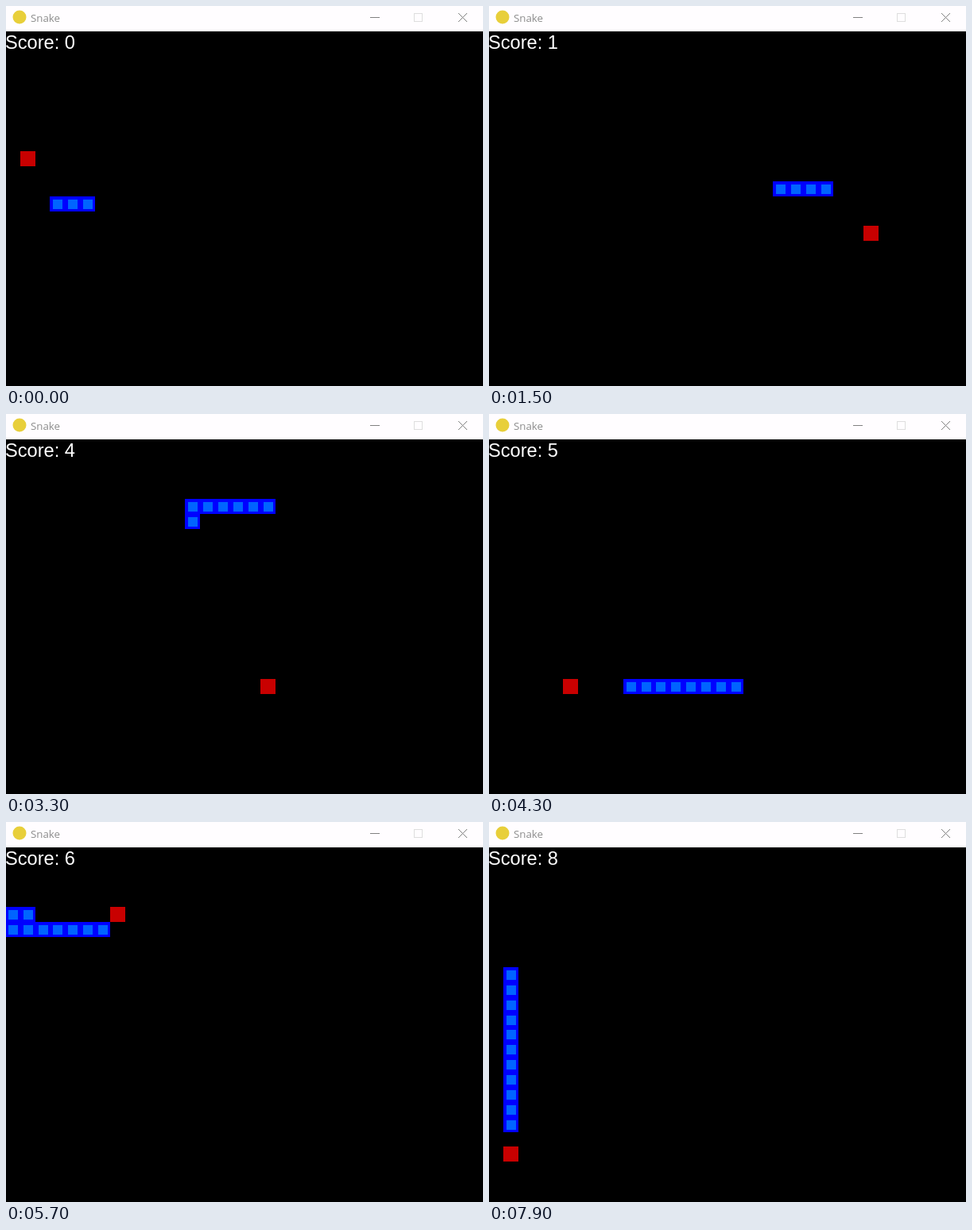
Write an HTML page with a canvas that moves like this. It is 600 by 479 pixels and loops after 8 s.

```html
<!DOCTYPE html>
<html lang="en">
<head>
<meta charset="utf-8">
<title>Snake</title>
<style>
  html, body { margin: 0; width: 100%; height: 100%; overflow: hidden; background: #000; }
  canvas { display: block; }
</style>
</head>
<body>
<canvas id="stage" width="600" height="479"></canvas>
<script>
const ctx = document.getElementById('stage').getContext('2d');
const LOOP = 8000, TICK = 100, CELL = 18.88, BAR = 32;
const STEP = { L: [-1, 0], R: [1, 0], U: [0, -1], D: [0, 1] };

// Direction and number of cells for each straight run
const route = 'L1 U3 L2 D2 R25 D3 R1 U6 L14 U3 R5 D12 L13 U12 L4 D1 R7 U2 L6 D4 R9 U1 L9 D12';
const foods = [[1, 8], [25, 13], [19, 7], [12, 4], [17, 16], [5, 16], [7, 4], [3, 7], [1, 20]];

// Cells in the order the head visits them, with the score on arrival
const trail = [[5, 11, 0], [4, 11, 0], [3, 11, 0]];
const START = trail.length - 1;
for (const run of route.split(' ')) {
  const [dx, dy] = STEP[run[0]];
  for (let n = +run.slice(1); n > 0; n--) {
    const [px, py, score] = trail[trail.length - 1];
    const x = px + dx, y = py + dy, [fx, fy] = foods[score];
    trail.push([x, y, score + (x === fx && y === fy)]);
  }
}

function square(col, row, color, inset = 0, size = 19) {
  ctx.fillStyle = color;
  ctx.fillRect(Math.round(col * CELL - 1.25) + inset,
               Math.round(BAR + row * 18.87) + inset, size, size);
}

function text(str, x, y, font, color) {
  ctx.font = font;
  ctx.fillStyle = color;
  ctx.fillText(str, x, y);
}

function line(color, ...points) {
  ctx.strokeStyle = color;
  ctx.beginPath();
  for (let i = 0; i < points.length; i += 4) {
    ctx.moveTo(points[i], points[i + 1]);
    ctx.lineTo(points[i + 2], points[i + 3]);
  }
  ctx.stroke();
}

function drawTitleBar() {
  ctx.fillStyle = '#fffdff';
  ctx.fillRect(0, 0, 600, BAR);
  ctx.fillStyle = '#e8cf3a';
  ctx.beginPath();
  ctx.arc(17, 14, 8.5, 0, 7);
  ctx.fill();
  text('Snake', 31, 20, '13.3px "Open Sans", "Noto Sans", sans-serif', '#8c8c8c');
  ctx.lineWidth = 1;
  line('#808080', 458, 14.5, 470, 14.5);
  ctx.strokeStyle = '#dedede';
  ctx.strokeRect(513.5, 9.5, 10, 10);
  line('#808080', 569, 9, 580, 20, 580, 9, 569, 20);
}

function draw(now) {
  const tick = Math.floor(now % LOOP / TICK);
  // Two cells per tick, with one cell lost to a short stall
  const head = START + 2 * tick - (tick > 30 ? 1 : 0);
  const score = trail[head][2];

  ctx.fillStyle = '#000';
  ctx.fillRect(0, 0, 600, 479);
  drawTitleBar();
  square(...foods[score], '#c80000');
  const body = trail.slice(Math.max(0, head - score - 2), head + 1);
  for (const [x, y] of body) square(x, y, '#0000ff');
  for (const [x, y] of body) square(x, y, '#0064ff', 4, 12);
  text('Score: ' + score, -1, 54, '23.6px "Liberation Sans", Arial, sans-serif', '#fff');
}

const began = performance.now();
function frame() {
  draw(performance.now() - began);
  requestAnimationFrame(frame);
}
frame();
</script>
</body>
</html>
```
